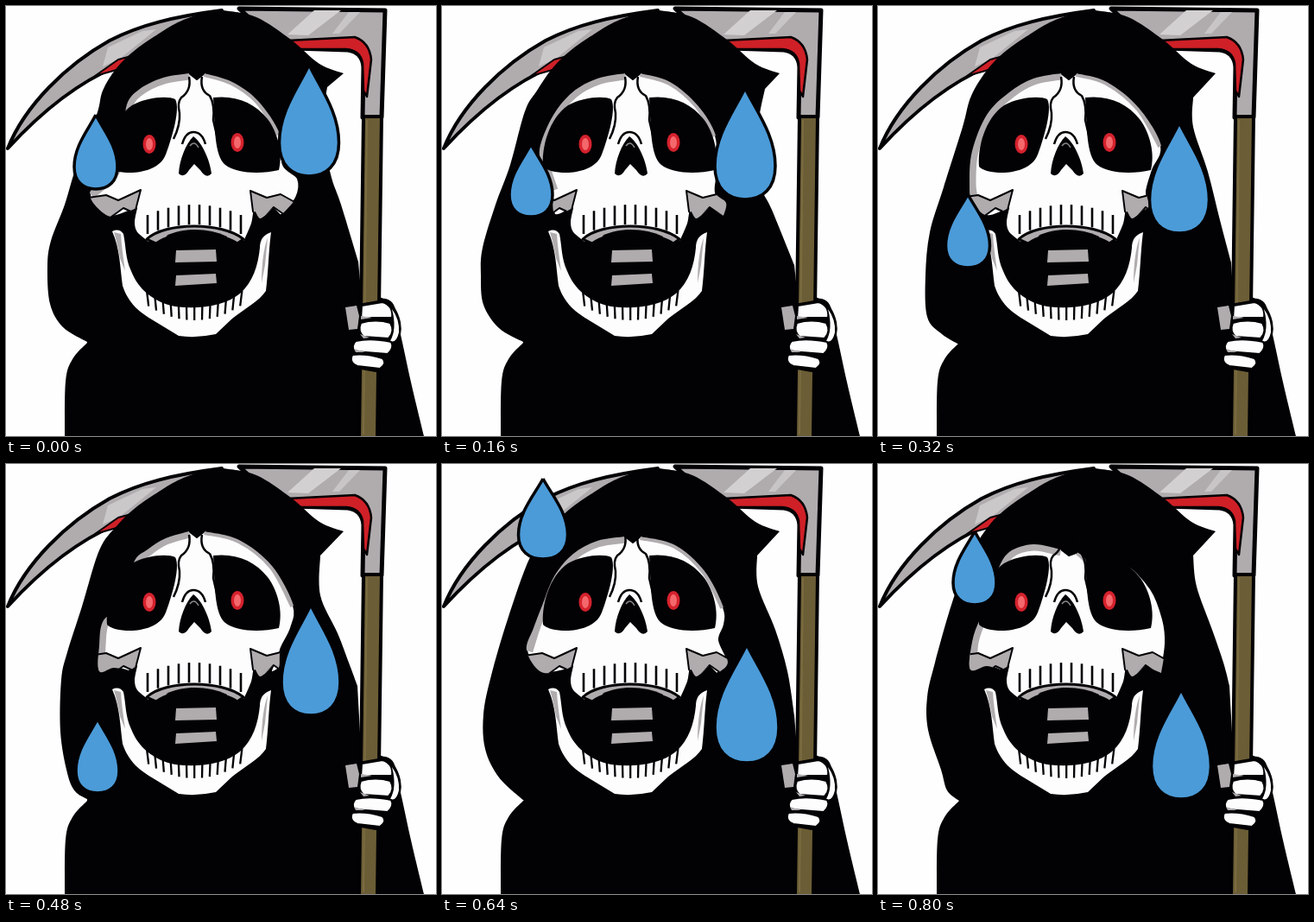
An HTML page with a canvas that plays this animation: 498x498 px, repeating every 0.96 s.

```html
<!DOCTYPE html>
<html lang="en">
<head>
<meta charset="utf-8">
<title>Sweating reaper</title>
<style>
html, body { margin: 0; width: 100%; height: 100%; overflow: hidden; background: #fefefe; }
canvas { display: block; width: 498px; height: 498px; }
</style>
</head>
<body>
<canvas id="stage" width="498" height="498"></canvas>
<script>
const ctx = document.getElementById('stage').getContext('2d');
const STEP = 160;
const BLACK = '#020104', WHITE = '#fdfdfd', GREY = '#b0acae', BLUE = '#4b9bd8', RED = '#cf2027', WOOD = '#6b5d35';

// Drops: [tip x, tip y, width, height]. Outlines: "x,y" points.
const poses = [
  {
    drops: [[104, 126, 50, 86], [351, 68, 69, 129]],
    cloakL: '128,72 112,98 105,126 82,184 68,230 52,272 48,302 51,345 66,372 94,389',
    cloakR: '372,94 366,140 376,195 388,230 408,296',
    skullL: '142,238 118,243 97,217 125,190 136,150 140,114 155,96 182,83 212,78',
    skullR: '230,78 262,88 292,110 317,148 321,184 338,200 336,222 318,243'
  },
  {
    drops: [[103, 160, 50, 84], [351, 95, 70, 129]],
    cloakL: '128,72 110,98 96,122 79,184 62,230 47,280 45,312 48,346 66,373 94,389',
    cloakR: '374,96 366,140 366,200 382,236 408,300',
    skullL: '142,239 130,241 127,214 119,190 113,166 128,128 151,100 180,84 212,78',
    skullR: '230,78 264,88 296,115 317,150 319,190 317,216 329,228 326,243'
  },
  {
    drops: [[104, 218, 51, 85], [349, 135, 69, 128]],
    cloakL: '128,72 108,104 98,140 76,210 60,262 55,312 57,360 74,380 94,392',
    cloakR: '365,106 365,140 382,192 396,248 409,297',
    skullL: '142,239 126,243 109,228 106,205 109,168 126,126 152,100 180,84 212,78',
    skullR: '230,78 265,88 302,118 328,162 318,190 311,215 314,231 306,241'
  },
  {
    drops: [[106, 295, 50, 86], [353, 163, 68, 128]],
    cloakL: '128,72 108,100 88,165 71,218 64,250 63,310 71,358 80,379 94,388',
    cloakR: '364,106 364,152 384,196 397,230 407,257',
    skullL: '142,240 125,236 108,240 108,210 113,181 138,160 148,114 164,99 185,86 212,78',
    skullR: '230,78 270,88 308,118 333,164 330,190 318,215 316,236 306,242'
  },
  {
    drops: [[117, 17, 57, 93], [353, 209, 74, 137]],
    cloakL: '128,72 102,108 76,180 57,245 48,290 50,330 66,363 95,390',
    cloakR: '365,106 366,142 386,192 400,240 408,291',
    skullL: '142,239 115,241 98,216 106,190 116,164 130,130 152,104 180,89 212,84',
    skullR: '230,84 270,94 304,124 326,166 327,186 321,204 331,230 318,243'
  },
  {
    drops: [[112, 78, 50, 85], [351, 261, 69, 127]],
    cloakL: '128,72 106,108 86,160 66,230 57,270 58,308 73,354 80,378 94,390',
    cloakR: '365,106 369,142 387,192 400,230 407,257',
    skullL: '142,239 126,234 107,238 109,206 118,180 132,155 138,125 152,102 180,93 212,99',
    skullR: '232,102 243,114 247,136 278,148 288,118 316,145 330,180 333,208 328,242'
  }
];

const parse = text => text.split(' ').map(p => p.split(',').map(Number));

// Adds a smooth curve through the points to the path.
function through(path, points) {
  path.lineTo(...points[0]);
  for (let i = 0; i < points.length - 1; i++) {
    const b = points[i], c = points[i + 1];
    const a = points[i - 1] || b, d = points[i + 2] || c;
    path.bezierCurveTo(
      b[0] + (c[0] - a[0]) / 6, b[1] + (c[1] - a[1]) / 6,
      c[0] - (d[0] - b[0]) / 6, c[1] - (d[1] - b[1]) / 6, c[0], c[1]);
  }
}

function paint(path, fill, line, width = 3) {
  const shape = typeof path === 'string' ? new Path2D(path) : path;
  if (fill) { ctx.fillStyle = fill; ctx.fill(shape); }
  if (line) { ctx.strokeStyle = line; ctx.lineWidth = width; ctx.stroke(shape); }
}

function oval(x, y, rx, ry, fill) {
  ctx.beginPath();
  ctx.ellipse(x, y, rx, ry, 0, 0, Math.PI * 2);
  ctx.fillStyle = fill;
  ctx.fill();
}

function scythe() {
  paint('M2 165C22 115 70 68 120 40C155 22 195 12 250 5L250 40L128 70C85 88 45 118 2 165Z', GREY, BLACK, 4);
  paint('M118 48L158 29L174 27L132 61L112 70Z', '#cbc8ca');
  paint('M103 81L130 62L145 58L128 74Z', RED, BLACK, 2);
  paint('M270 3L439 5L435 129L413 129L414 70Q412 53 396 51L335 49L300 30Z', GREY, BLACK, 5);
  paint('M357 5L388 5L350 34L326 33Z', '#d3d0d2');
  paint('M397 7L410 7L386 32L378 32Z', '#c8c5c7');
  paint('M326 40L404 36Q421 42 423 62L418 105L414 98L413 66Q410 51 394 50L336 50Z', RED, BLACK, 2.5);
}

function staff() {
  paint('M414 128L435 128L430 500L409 500Z', WOOD, BLACK, 4);
  paint('M418 132L414 496', null, '#7b6c41', 2);
}

function cloak(pose) {
  const p = new Path2D('M252 5C226 6 199 18 188 25');
  through(p, parse('188,25 152,49 ' + pose.cloakL));
  through(p, parse('94,390 77,409 69,435 68,500'));
  p.lineTo(484, 500);
  through(p, parse('484,498 470,440 458,385 449,346 435,338'));
  p.lineTo(411, 330);
  through(p, parse(pose.cloakR).reverse());
  p.lineTo(391, 78);
  through(p, parse('391,78 363,67 330,39 290,13 252,5'));
  paint(p, BLACK);
}

function skull(pose) {
  const left = parse(pose.skullL), right = parse(pose.skullR);
  const p = new Path2D();
  p.moveTo(...left[0]);
  through(p, left);
  p.lineTo(221, 85 + (left[left.length - 1][1] - 78));
  through(p, right);
  through(p, parse('309,234 295,246 288,238 285,252 276,273'));
  p.bezierCurveTo(252, 258, 187, 252, 165, 274);
  through(p, parse('165,274 151,262 148,250 151,234'));
  p.closePath();
  paint(p, WHITE, BLACK, 2);

  ctx.save();
  ctx.clip(p);
  const edge = new Path2D();
  edge.moveTo(...left[2]);
  through(edge, left.slice(2));
  paint(edge, null, GREY, 15);
  const rim = new Path2D();
  rim.moveTo(...right[0]);
  through(rim, right.slice(0, 4));
  paint(rim, null, GREY, 8);
  paint('M95 222L116 219L130 225L156 213L149 240L136 234L118 247L100 244Z', GREY, BLACK, 2);
  paint('M283 214L302 222L318 218L336 228L330 247L310 233L295 250L286 238Z', GREY, BLACK, 2);
  ctx.restore();

  paint('M117 186C115 164 124 130 146 115C164 105 188 104 196 108C202 119 193 150 185 172C179 188 158 193 144 193Q124 193 117 186Z', BLACK);
  paint('M240 106C266 103 288 112 303 131C315 147 321 171 316 190C294 195 267 194 254 184C241 173 242 140 240 106Z', BLACK);
  paint('M212 82Q215 98 203 106Q198 112 201 124Q202 138 194 154M227 82Q224 98 236 104Q242 114 240 132L246 158', null, BLACK, 2.5);
}

function face() {
  for (const [x, y] of [[166, 160], [268, 158]]) {
    oval(x, y, 7.5, 11, '#d5222d');
    oval(x, y, 4, 7, '#f4686c');
  }
  paint('M204 160Q208 146 217 146Q227 146 231 160', null, BLACK, 2.5);
  paint('M217 151C208 160 201 178 200 194Q206 200 212 190L218 183L225 190Q232 201 238 194C236 178 227 158 217 151Z', BLACK);
  paint('M213 162Q218 155 223 164', null, '#8a8789', 1.5);

  // Upper teeth and gum
  for (let i = 0; i < 10; i++) {
    const x = 164 + i * 12, bow = ((x - 218) / 54) ** 2;
    paint(`M${x} ${230 + 12 * bow}L${x} ${253 + 11 * bow}`, null, BLACK, 2.6);
  }
  paint('M163 270C184 250 251 250 275 270L268 275C247 261 195 259 174 275Z', GREY, BLACK, 3);
  paint('M186 266C205 256 236 257 256 267L254 276L186 276Z', BLACK);

  paint('M197 283L243 282L244 296L196 297Z', GREY);
  paint('M197 312L243 310L244 321L196 324Z', GREY);

  // Lower jaw
  paint('M123 261Q131 257 136 264C139 278 138 292 145 307C153 328 171 343 196 348C224 352 254 347 271 333C286 320 292 300 294 280Q294 266 307 262C304 285 304 306 301 330C293 342 277 350 262 362L243 380Q220 385 200 382L172 365C155 355 142 345 135 324C132 302 132 281 123 261Z', WHITE);
  paint('M125 262Q129 275 132 292L138 307Q134 280 133 264Z', GREY);
  paint('M303 268L300 300L296 321Q296 288 303 268Z', GREY);
  for (let i = 0; i < 13; i++) {
    const x = 163 + i * 9.2, y = 352 - 17 * ((x - 218) / 56) ** 2;
    paint(`M${x} ${y - 6}L${x + (218 - x) * 0.04} ${y + 12}`, null, BLACK, 2.3);
  }
}

function hand() {
  paint('M392 348L408 345L437 340Q452 344 457 366Q460 382 451 392L446 418L428 424L400 419L397 402L405 380L394 374Z', BLACK);
  paint('M393 349L406 347L409 359L407 374L397 375Z', GREY);
  paint('M412 347L436 343Q449 347 447 361L424 361L411 363Z', WHITE, BLACK, 2);
  paint('M447 351Q456 363 455 378Q452 391 445 388Q453 374 447 351Z', WHITE);
  paint('M411 367Q428 362 445 367Q451 377 443 385L414 383Q407 377 411 367Z', WHITE, BLACK, 2);
  paint('M405 388Q422 384 446 389Q450 396 442 403L404 400Q399 394 405 388Z', WHITE, BLACK, 2);
  paint('M401 404Q417 402 436 408Q442 414 433 420L407 417Q397 413 401 404Z', WHITE, BLACK, 2);
  paint('M411 359L424 361L411 363ZM410 380L421 384L414 385ZM403 397L416 401L405 401Z', GREY);
}

function drop([x, y, w, h]) {
  const r = w / 2, p = new Path2D();
  p.moveTo(x, y);
  p.bezierCurveTo(x + r * 0.35, y + h * 0.2, x + r, y + h * 0.42, x + r, y + h * 0.7);
  p.bezierCurveTo(x + r, y + h * 0.9, x + r * 0.58, y + h, x, y + h);
  p.bezierCurveTo(x - r * 0.58, y + h, x - r, y + h * 0.9, x - r, y + h * 0.7);
  p.bezierCurveTo(x - r, y + h * 0.42, x - r * 0.35, y + h * 0.2, x, y);
  paint(p, BLUE, BLACK, 3.5);
}

function draw(now) {
  const pose = poses[Math.floor(now / STEP) % poses.length];
  ctx.lineJoin = 'round';
  ctx.fillStyle = '#fefefe';
  ctx.fillRect(0, 0, 498, 498);
  scythe();
  cloak(pose);
  staff();
  skull(pose);
  face();
  hand();
  pose.drops.forEach(drop);
}

let start;
function tick(now) {
  start ??= now;
  draw(now - start);
  requestAnimationFrame(tick);
}
draw(0);
requestAnimationFrame(tick);
</script>
</body>
</html>
```
